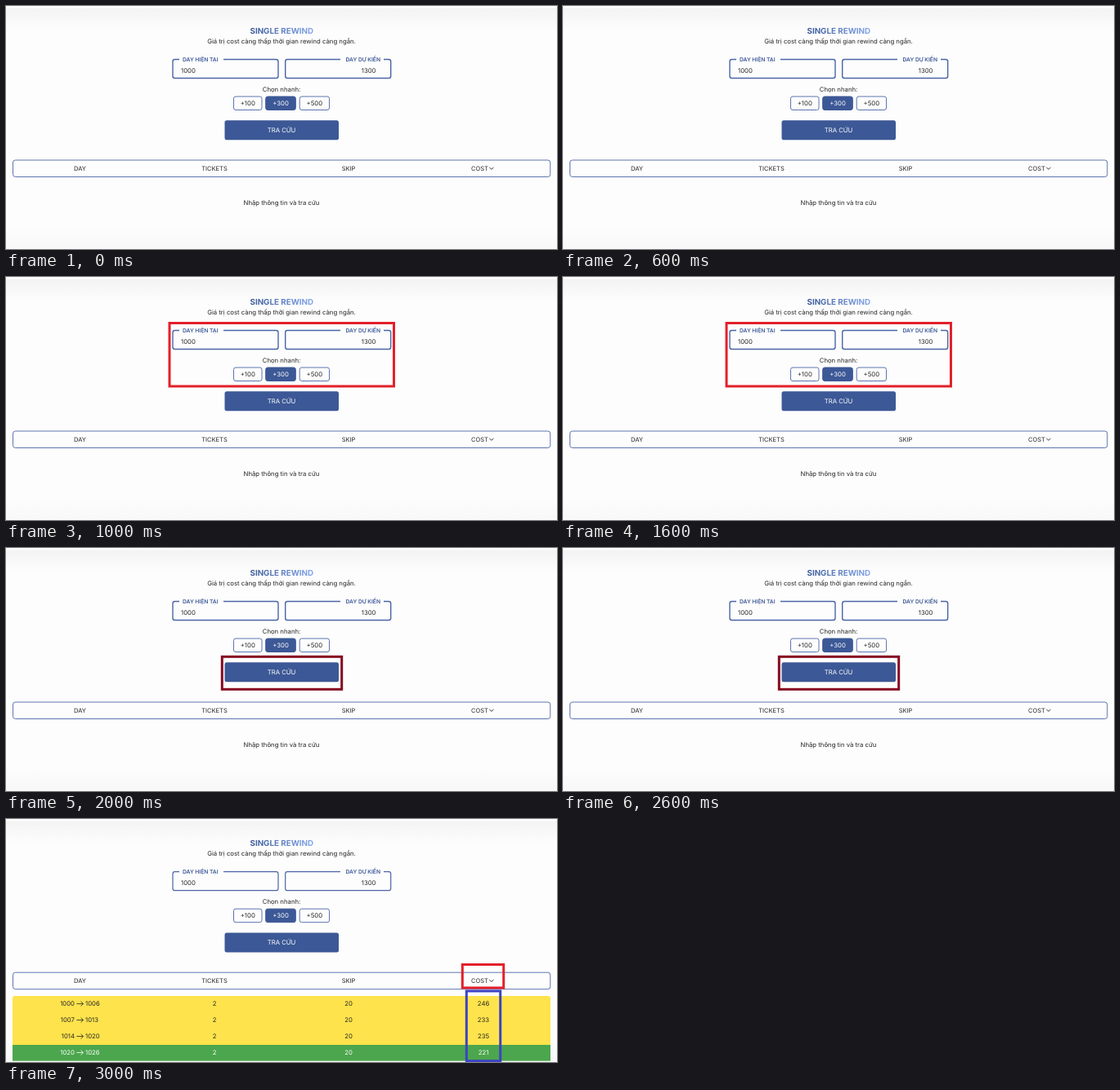
An HTML page that plays this animation: 674 by 298 pixels, repeating every 4 s.

```html
<!DOCTYPE html>
<html lang="vi">
<head>
<meta charset="utf-8">
<title>Single Rewind</title>
<style>
html, body { margin: 0; width: 100%; height: 100%; overflow: hidden; background: #fdfdfd; }
svg { display: block; width: 100%; height: 100%; }
text { font: 7.75px Inter, "Open Sans", sans-serif; fill: #262626; text-rendering: geometricPrecision; }
.head { font-size: 7.5px; }
.title { font-size: 9.8px; font-weight: 700; fill: url(#ink); }
.legend { font-size: 6.7px; font-weight: 600; fill: #3d5997; }
.light { fill: #fff; }
.line { fill: none; stroke: #4a65a6; }
.mid { text-anchor: middle; }
.end { text-anchor: end; }
.mark { fill: none; stroke-width: 3; }
</style>
</head>
<body>
<svg id="stage" viewBox="0 0 674 298" xmlns="http://www.w3.org/2000/svg">
  <defs>
    <linearGradient id="ink" gradientUnits="userSpaceOnUse" x1="298" y1="0" x2="377" y2="0">
      <stop offset="0" stop-color="#3b5998"/><stop offset="1" stop-color="#86a8ec"/>
    </linearGradient>
    <linearGradient id="top" x1="0" y1="0" x2="0" y2="1">
      <stop offset="0" stop-color="#f3f3f3"/><stop offset="1" stop-color="#fdfdfd"/>
    </linearGradient>
    <linearGradient id="bottom" x1="0" y1="0" x2="0" y2="1">
      <stop offset="0" stop-color="#fdfdfd"/><stop offset="1" stop-color="#f8f8f8"/>
    </linearGradient>
  </defs>
  <rect width="674" height="298" fill="#fdfdfd"/>
  <rect y="2.5" width="674" height="27" fill="url(#top)"/>
  <rect y="270" width="674" height="27" fill="url(#bottom)"/>
  <g id="form"></g>
  <text id="hint" class="mid" x="337" y="244">Nhập thông tin và tra cứu</text>
  <g id="rows"></g>
  <g id="marks"></g>
</svg>
<script>
const STEP = 1000;
const BLUE = '#3c5896';
const COLS = [90.5, 255, 419, 584];
const $ = id => document.getElementById(id);

const text = (x, y, s, cls = 'mid') => `<text x="${x}" y="${y}" class="${cls}">${s}</text>`;
const box = (x, y, w, h, r, attrs) =>
  `<rect x="${x}" y="${y}" width="${w}" height="${h}" rx="${r}" ${attrs}/>`;

// Outlined field whose top edge is open between a and b
function field(x, a, b) {
  const l = x, r = x + 129, t = 65.5, e = 88.5;
  return `<path class="line field" d="M${a} ${t}H${l + 2.5}Q${l} ${t} ${l} ${t + 2.5}V${e - 2.5}
    Q${l} ${e} ${l + 2.5} ${e}H${r - 2.5}Q${r} ${e} ${r} ${e - 2.5}V${t + 2.5}
    Q${r} ${t} ${r - 2.5} ${t}H${b}"/>`;
}

function choice(x, w, label, on) {
  return box(x, 111, w, 16.5, 2.5, on ? `fill="${BLUE}" stroke="${BLUE}"` : 'class="line" stroke-width=".9"')
    + text(x + w / 2, 122.1, label, on ? 'mid light' : 'mid');
}

$('form').innerHTML = [
  text(337.3, 33.6, 'SINGLE REWIND', 'mid title'),
  text(337, 45.6, 'Giá trị cost càng thấp thời gian rewind càng ngắn.'),
  field(204, 212, 266),
  field(341.7, 409, 462),
  text(216, 67.8, 'DAY HIỆN TẠI', 'legend'),
  text(458, 67.8, 'DAY DỰ KIẾN', 'legend end'),
  text(214, 82.2, '1000', ''),
  text(452.5, 82.2, '1300', 'end'),
  text(337, 105.2, 'Chọn nhanh:'),
  choice(278.5, 34.5, '+100', false),
  choice(317.7, 36.6, '+300', true),
  choice(359.2, 36.3, '+500', false),
  box(267.5, 140.3, 139.5, 24, 2.5, `fill="${BLUE}"`),
  text(337, 154.9, 'TRA CỨU', 'mid light'),
  box(8.5, 189, 657.3, 20.5, 3, 'class="line" stroke-width=".9"'),
  ...['DAY', 'TICKETS', 'SKIP'].map((s, i) => text(COLS[i], 201.6, s, 'mid head')),
  text(569, 201.6, 'COST', 'head'),
  '<path d="M591.3 198l2.6 2.3 2.6-2.3" fill="none" stroke="#262626" stroke-width=".9"/>'
].join('');

const DATA = [[1000, 1006, 246], [1007, 1013, 233], [1014, 1020, 235], [1020, 1026, 221]];
$('rows').innerHTML =
  '<path d="M8 277V220Q8 217 11 217H663Q666 217 666 220V277Z" fill="#fee34c"/>' +
  '<rect x="8" y="277" width="658" height="19.7" fill="#4ca64d"/>' +
  DATA.map(([from, to, cost], i) => {
    const y = 229.4 + i * 19.95, ink = i === 3 ? 'light' : '';
    const tip = y - 2.8;
    return text(84, y, from, 'end ' + ink)
      + `<path d="M86.3 ${tip}h8.2m-3-2.8l3 2.8l-3 2.8" fill="none" stroke="${ink ? '#fff' : '#262626'}" stroke-width=".8"/>`
      + text(97, y, to, ink)
      + [2, 20, cost].map((v, c) => text(COLS[c + 1], y, v, 'mid ' + ink)).join('');
  }).join('');

// step, left, top, width, height, colour
const MARKS = [
  [1, 200, 56.5, 274.5, 77.5, '#e3202a'],
  [2, 264.3, 133.3, 146.4, 40, '#850a20'],
  [3, 558.3, 178.5, 50.4, 28.5, '#e3202a'],
  [3, 563.3, 211, 41.4, 85.7, '#3b43c4']
];
$('marks').innerHTML = MARKS.map(([, x, y, w, h, c]) =>
  box(x, y, w, h, 0, `class="mark" stroke="${c}"`)).join('');
const marks = [...$('marks').children];
const fields = document.querySelectorAll('.field');

const show = (el, on) => el.setAttribute('visibility', on ? 'visible' : 'hidden');
let last = -1;

function draw(now) {
  const step = Math.floor(now / STEP) % 4;
  if (step !== last) {
    last = step;
    const done = step === 3;
    $('form').setAttribute('transform', `translate(0 ${done ? -0.8 : 0})`);
    fields.forEach(f => f.setAttribute('stroke-width', done ? 1.2 : 1.4));
    show($('hint'), !done);
    show($('rows'), done);
    marks.forEach((m, i) => show(m, MARKS[i][0] === step));
  }
}

const start = performance.now();
function tick() {
  draw(performance.now() - start);
  requestAnimationFrame(tick);
}
tick();
</script>
</body>
</html>
```
